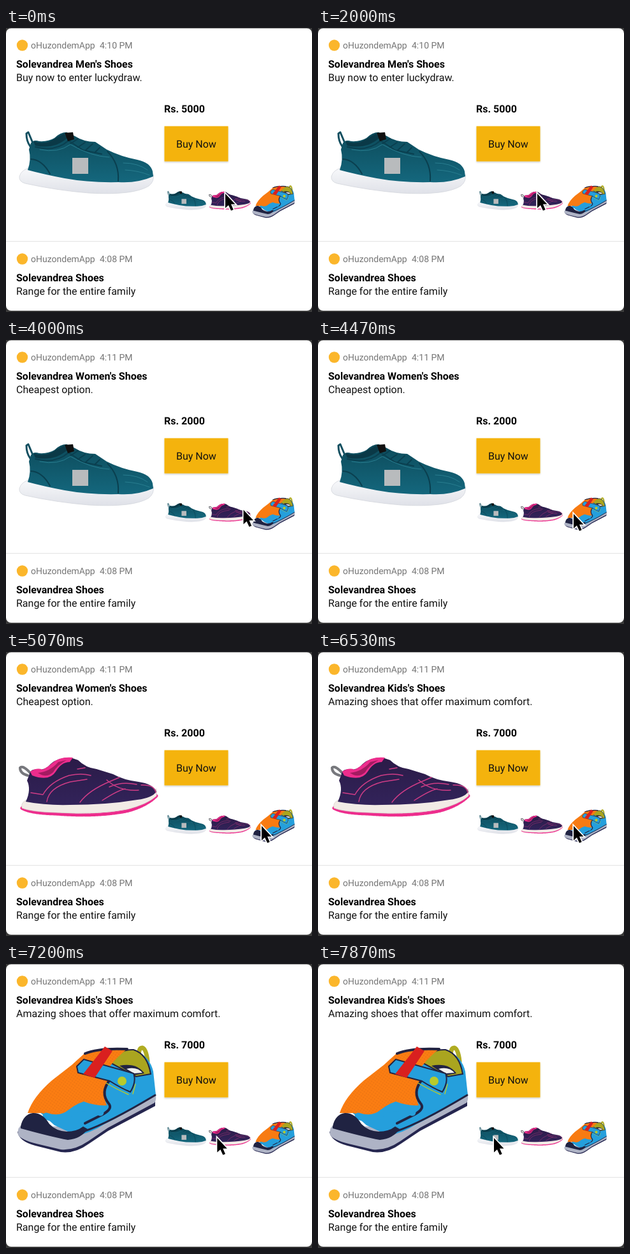
These frames come from a looping animation (480x444 px, 8000 ms). An HTML page:

```html
<!DOCTYPE html>
<html lang="en">
<head>
<meta charset="utf-8">
<title>Shoe notification</title>
<style>
  html, body { margin: 0; width: 100%; height: 100%; overflow: hidden; background: #3a3a3a; }
  svg { display: block; width: 480px; height: 444px; font: 16px Roboto, sans-serif; fill: #111; text-rendering: geometricPrecision; }
  .bold { font-weight: 700; fill: #000; }
  .meta { font-size: 14px; fill: #757575; }
  .line { fill: none; stroke-linecap: round; stroke-linejoin: round; }
</style>
</head>
<body>
<svg viewBox="0 0 480 444">
  <defs>
    <linearGradient id="tealFill" x2="0" y2="1">
      <stop stop-color="#0d4b5b"/><stop offset="1" stop-color="#14677d"/>
    </linearGradient>
    <linearGradient id="soleFill" x2="0" y2="1">
      <stop stop-color="#f8f9fb"/><stop offset="1" stop-color="#dfe1e8"/>
    </linearGradient>
    <linearGradient id="purpleFill" x2="0" y2="1">
      <stop stop-color="#2b1b47"/><stop offset="1" stop-color="#32235a"/>
    </linearGradient>
    <pattern id="mesh" width="4" height="4" patternUnits="userSpaceOnUse" patternTransform="rotate(35)">
      <rect width="4" height="4" fill="#fb7d12"/><circle cx="2" cy="2" r=".8" fill="#e06c10"/>
    </pattern>
    <filter id="shadow" x="-10%" y="-10%" width="120%" height="130%">
      <feDropShadow dx="0" dy="1.5" stdDeviation="1.3" flood-opacity=".2"/>
    </filter>

    <g id="teal">
      <path class="line" stroke="#124f60" stroke-width="3" d="M43 182L35 163L32 165Q32 177 38 185"/>
      <path fill="url(#soleFill)" stroke="#d4d6dc" stroke-width=".8" d="M36 219Q24 222 21 232Q20 240 30 243Q80 254 130 258Q200 262 224 247Q233 240 231 229L140 236Z"/>
      <path fill="url(#tealFill)" d="M39 180Q43 174 52 177Q66 178 76 172Q85 163 95 163L108 169Q122 178 140 178L158 190Q180 201 206 206Q226 210 230 224L231 232Q206 243 176 241Q130 242 92 235Q60 229 34 222Q40 206 36 190Z"/>
      <path fill="#0a3947" d="M43 177Q62 184 78 172L91 165L96 172Q76 190 46 184Z"/>
      <path class="line" stroke="#0a3f4f" stroke-width="2" d="M46 186Q78 194 98 176L121 191L150 197M113 173L101 181M124 179L112 187M136 181L125 191M147 187L139 195M159 193Q178 212 176 239M39 205Q57 206 69 228"/>
      <path class="line" stroke="#287e90" stroke-width="1" d="M53 190Q82 196 101 182Q134 201 162 202M184 211Q207 211 222 222M187 222Q208 223 225 230"/>
      <path fill="#111" d="M92 164L105 163L107 174L97 177Z"/>
      <rect x="104" y="203" width="25" height="25" fill="#b8bbbd"/>
    </g>

    <g id="purple">
      <path class="line" stroke="#77787d" stroke-width="4" d="M34 193Q22 190 22 181Q25 177 34 185L39 190"/>
      <path class="line" stroke="#ed2d8d" stroke-width="5" stroke-dasharray="3 1.5" stroke-linecap="butt" d="M25 244Q38 252 78 253Q140 258 188 249Q218 242 236 225"/>
      <path fill="#f2ebe6" stroke="#d5c9c6" stroke-width=".7" d="M31 232Q23 236 25 244Q40 250 78 251Q142 255 190 246Q222 238 236 225V214Q166 236 80 238Z"/>
      <path fill="url(#purpleFill)" d="M37 190Q40 182 49 184Q62 185 70 175Q81 165 101 165L113 169Q125 181 142 183L168 191Q184 200 208 203Q230 206 236 218Q230 228 206 231Q158 239 100 239Q62 240 31 234Q40 215 33 201Z"/>
      <path fill="#ed2d8d" d="M38 187Q49 180 57 184Q67 179 72 174Q84 163 105 165L100 172Q87 172 78 187Q68 203 41 193Z"/>
      <path fill="#a31b61" d="M50 189Q69 187 82 172L95 169Q80 177 74 188Q63 198 50 189Z"/>
      <path class="line" stroke="#cf3c86" stroke-width="1.4" d="M112 183L124 181M39 220L58 223Q69 203 99 193Q118 189 133 193M64 234Q67 212 101 203L127 199M116 235Q130 216 164 202L178 196M158 200Q177 218 208 216M162 211Q181 202 205 207M151 232Q176 216 187 214M212 208Q233 207 235 220"/>
    </g>

    <g id="kids">
      <path class="line" stroke="#b0ac22" stroke-width="7" d="M209 146Q207 131 214 131Q220 133 222 152"/>
      <path fill="#25264f" d="M18 262Q20 277 46 284L86 294Q108 297 130 281L160 261L234 222V208L110 270Z"/>
      <path fill="#aeb3c5" d="M25 252Q17 255 19 267Q24 275 48 281L86 290Q107 292 129 277L160 256L233 217Q237 211 234 200L110 255Z"/>
      <path fill="#259fdc" d="M50 229L75 184L150 140L205 136Q226 146 231 168L235 205Q190 233 155 250Q132 265 110 268L76 252Z"/>
      <path fill="#aaa51f" stroke="#222342" stroke-width="2" d="M161 153Q177 133 200 134Q222 141 227 172L204 176Z"/>
      <path fill="#222342" d="M178 159Q205 154 217 171L200 174Z"/>
      <path fill="#f1f1ee" d="M189 164Q205 160 214 170L201 171Z"/>
      <path fill="url(#mesh)" d="M34 233Q42 208 72 182L103 158L124 139Q145 130 190 133Q174 145 163 160L163 180Q149 199 158 221Q140 222 122 215Q106 220 95 232Q78 242 56 233Z"/>
      <path class="line" stroke="#222342" stroke-width="4" d="M124 140Q145 131 190 133M163 181Q147 201 161 218Q168 226 152 235L124 249"/>
      <path class="line" stroke="#259fdc" stroke-width="11" d="M63 238Q86 246 102 232Q119 218 148 232"/>
      <path fill="#202342" d="M23 254Q27 235 42 233Q57 232 68 250Q78 261 95 262Q111 262 121 254L128 258Q118 273 97 275Q70 270 23 257Z"/>
      <path class="line" stroke="#222342" stroke-width="3" d="M124 261Q160 249 234 205"/>
      <path fill="#259fdc" stroke="#222342" stroke-width="2" d="M111 160L122 149L200 171Q205 184 195 200Q180 194 163 183L113 170Z"/>
      <path fill="#d9201f" d="M155 129L167 136L139 178L121 172Z"/>
      <path class="line" stroke="#b8ca2d" stroke-width="1.4" d="M157 186Q172 195 192 204M203 188L199 203"/>
      <circle cx="182" cy="183" r="7" fill="#b8ca2d"/>
    </g>
  </defs>

  <rect y=".5" width="480" height="441.5" rx="8" fill="#fff"/>
  <path d="M0 333.5H480" stroke="#e3e3e3"/>
  <g fill="#fbb62b"><circle cx="25.5" cy="27" r="8.7"/><circle cx="25.5" cy="361" r="8.7"/></g>
  <g class="meta">
    <text x="39" y="32">oHuzondemApp</text><text id="clock" x="147" y="32"></text>
    <text x="39" y="366">oHuzondemApp</text><text x="147" y="366">4:08 PM</text>
  </g>
  <text id="heading" class="bold" x="16" y="62"></text>
  <text id="message" x="16" y="83"></text>
  <text id="price" class="bold" x="248" y="132"></text>
  <text class="bold" x="16" y="396">Solevandrea Shoes</text>
  <text x="16" y="417">Range for the entire family</text>

  <rect x="248.5" y="153.5" width="100" height="55" fill="#f4b30b" filter="url(#shadow)"/>
  <text x="267" y="187">Buy Now</text>

  <use id="hero"/>
  <use href="#teal" transform="translate(244 206) scale(.302)"/>
  <use href="#purple" transform="translate(312 206) scale(.302)"/>
  <use href="#kids" transform="translate(381 207) scale(.305)"/>

  <path id="cursor" d="M0 0V22.5L5 18L9 26.5L12.7 25L9 16.5H15.5Z" fill="#000" stroke="#fff" stroke-width="3.4" paint-order="stroke"/>
</svg>
<script>
  const LOOP = 8000, TICK = 1000 / 15;
  const $ = id => document.getElementById(id);

  // Times below are counted in ticks of 1/15 s.
  const offers = [
    { from: 0, clock: '4:10 PM', heading: "Solevandrea Men's Shoes", message: 'Buy now to enter luckydraw.', price: 'Rs. 5000' },
    { from: 51, clock: '4:11 PM', heading: "Solevandrea Women's Shoes", message: 'Cheapest option.', price: 'Rs. 2000' },
    { from: 85, clock: '4:11 PM', heading: "Solevandrea Kids's Shoes", message: 'Amazing shoes that offer maximum comfort.', price: 'Rs. 7000' }
  ];
  const heroes = [{ from: 0, shoe: 'teal' }, { from: 68, shoe: 'purple' }, { from: 102, shoe: 'kids' }];
  const moves = [
    { start: 57, end: 63, dx: 57, dy: 13 },
    { start: 101, end: 114, dx: -125, dy: 0 }
  ];

  const current = (list, tick) => list.filter(item => item.from <= tick).pop();
  const ease = p => p * p * (3 - 2 * p);

  function render(time) {
    const tick = Math.floor(time / TICK + 0.06);
    const offer = current(offers, tick);
    for (const id of ['clock', 'heading', 'message', 'price']) $(id).textContent = offer[id];
    $('hero').setAttribute('href', '#' + current(heroes, tick).shoe);

    let x = 344, y = 259;
    for (const { start, end, dx, dy } of moves) {
      const p = ease(Math.min(1, Math.max(0, (tick - start) / (end - start))));
      x += dx * p;
      y += dy * p;
    }
    $('cursor').setAttribute('transform', `translate(${x} ${y})`);
  }

  const begin = performance.now();
  function frame() {
    render((performance.now() - begin) % LOOP);
    requestAnimationFrame(frame);
  }
  frame();
</script>
</body>
</html>
```
